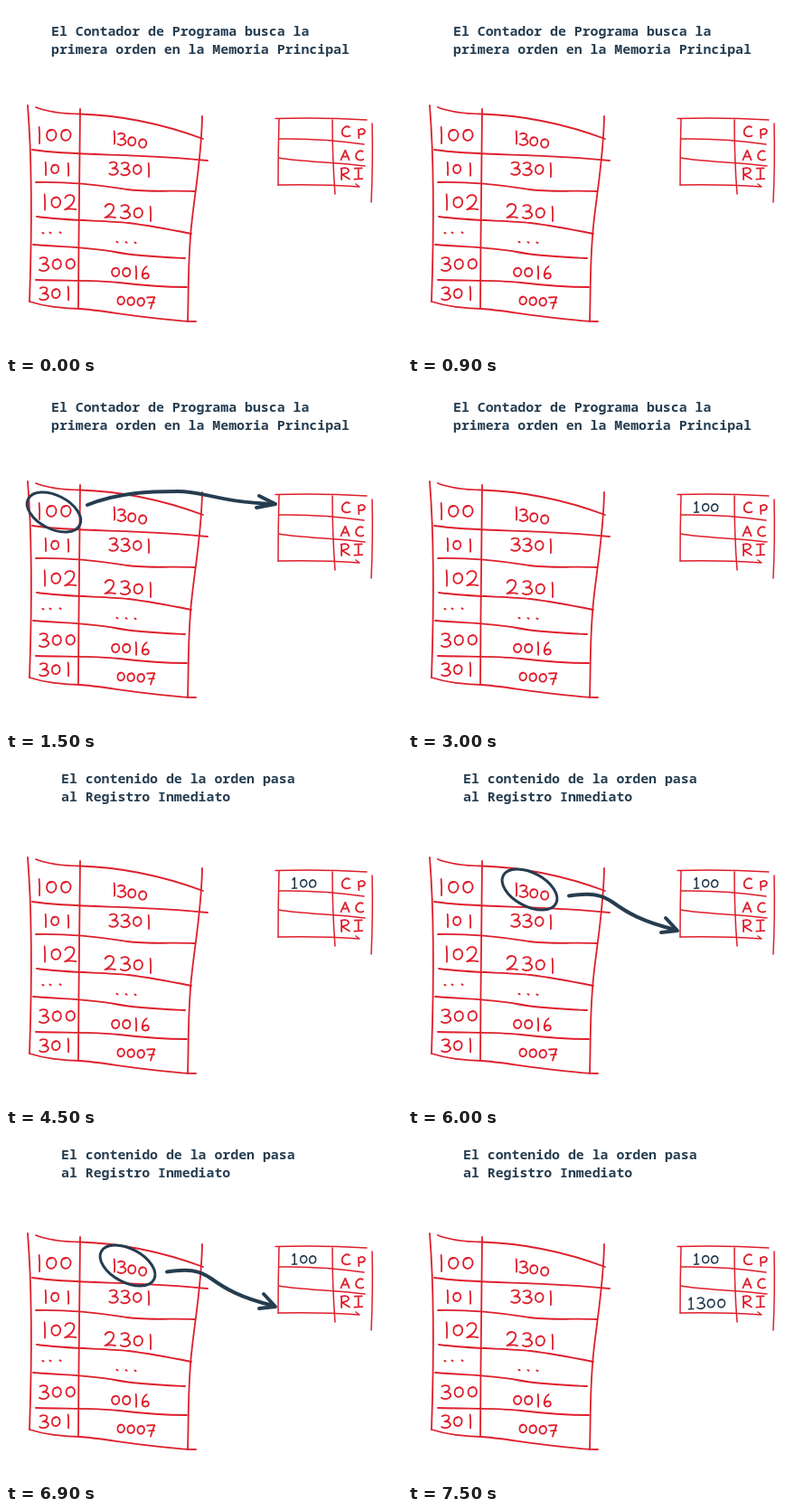
Recreate the animation shown at these times as an HTML page. Size 438x385 px, loop 8 s.

```html
<!DOCTYPE html>
<html lang="es">
<head>
<meta charset="utf-8">
<title>Ciclo de instrucción</title>
<style>
  html, body { margin: 0; width: 100%; height: 100%; overflow: hidden; background: #fff; }
  svg { display: block; width: 438px; height: 385px; }
  path { fill: none; stroke-linecap: round; stroke-linejoin: round; }
  .red { stroke: #de1f2c; stroke-width: 1.8; }
  #registers { stroke-width: 1.5; }
  .navy { stroke: #263d50; stroke-width: 1.6; }
  .mark { stroke: #263d50; stroke-width: 3; fill: none; }
  .arrow { stroke-width: 4; }
  text { font: 700 14.87px "Noto Sans Mono", "DejaVu Sans Mono", monospace; fill: #263d50; white-space: pre; }
</style>
</head>
<body>
<svg viewBox="0 0 438 385">
  <g class="red" id="memory">
    <path d="M24 110C28 160 29 240 26 327"/>
    <path d="M82 114C82 180 80 260 80 334"/>
    <path d="M217 122C216 175 207 215 204 255S202 320 201 349"/>
    <path d="M33 112Q50 119 82 119.500C130 121 175 131 218 147"/>
    <path d="M29 159C75 166 145 163 223 171"/>
    <path d="M33 195C80 194 115 200 135 203S185 204 209 205"/>
    <path d="M34 233C70 238 110 237 135 240S185 248 205 252"/>
    <path d="M30 264C70 267 95 267 120 272S175 278 198 279"/>
    <path d="M33 303C70 304 100 303 125 306S175 311 200 311"/>
    <path d="M26 327C45 333 60 334 82 335S165 348 210 349"/>
  </g>
  <g class="red" id="registers">
    <path d="M298 124.500Q350 123 399 126"/>
    <path d="M302 125Q301 160 301 198"/>
    <path d="M301 198Q350 197 391 200L387 197"/>
    <path d="M302 147Q350 146 396 153"/>
    <path d="M302 168C330 173 360 172 397 177"/>
    <path d="M361 126Q361 170 364 208"/>
    <path d="M405 130Q406 175 404 217"/>
  </g>

  <g data-from="0" data-to="4500">
    <text x="50" y="33">El Contador de Programa busca la</text>
    <text x="50" y="53">primera orden en la Memoria Principal</text>
  </g>
  <g data-from="4500" data-to="8000">
    <text x="61" y="28">El contenido de la orden pasa</text>
    <text x="61" y="48">al Registro Inmediato</text>
  </g>
  <g class="mark" data-from="1500" data-to="3000">
    <ellipse rx="32" ry="18.5" transform="translate(53 144) rotate(27)"/>
    <path class="arrow" d="M90 136C125 122 160 121 190 121S235 133 297 135"/>
    <path class="arrow" d="M280 126L298 135L277 139"/>
  </g>
  <g class="mark" data-from="6000" data-to="7500">
    <ellipse rx="33" ry="18.5" transform="translate(134.500 145.500) rotate(28)"/>
    <path class="arrow" d="M178 152.500C200 149 213 150 227 160S258 181 296 190"/>
    <path class="arrow" d="M285 177L298 191L280 193"/>
  </g>
  <g id="cp" data-from="3000" data-to="8000"></g>
  <g id="ri" data-from="7500" data-to="8000"></g>
</svg>
<script>
const LOOP = 8000;

// Handwritten strokes in a box one unit high, centred on the origin.
const GLYPHS = {
  0: 'M.04-.33C-.22-.37-.32-.08-.26.13S.02.37.17.27S.36-.11.23-.25S-.02-.33-.08-.28',
  1: 'M-.02-.5Q.03 0 0 .5',
  i: 'M-.15-.32L.02-.5V.47M-.2.48L.22.46',
  2: 'M-.33-.3C-.2-.6.32-.55.26-.2C.2.1-.1.32-.35.45Q0 .35.38.44',
  3: 'M-.28-.42C0-.58.35-.45.2-.2Q.12-.04-.1-.03C.3-.07.45.2.2.38Q-.05.53-.32.36',
  6: 'M.12-.5C-.2-.3-.28.1-.22.32C-.1.55.3.48.27.2C.22-.04-.12 0-.21.24',
  7: 'M-.3-.43Q0-.48.33-.46Q.15 0 0 .5M-.15.02L.3 0',
  '.': 'M-.04-.02L.04.03',
  C: 'M.32-.42C0-.6-.37-.3-.36.05S.05.55.38.38',
  P: 'M-.25-.25L-.22.5M-.25-.2C.1-.5.4-.25.3 0Q.2.2-.2.15',
  A: 'M-.42.48L.02-.48L.42.48M-.27.15L.3.12',
  R: 'M-.3-.45V.5M-.35-.43C.3-.65.5-.2.1-.02L-.28.06L.38.46',
  I: 'M-.3-.45L.32-.47M.02-.45V.45M-.32.47L.35.44'
};

function write(parent, color, chars, size, y, slope, xs) {
  xs.forEach((x, i) => {
    const path = document.createElementNS('http://www.w3.org/2000/svg', 'path');
    path.setAttribute('d', GLYPHS[chars[i]]);
    path.setAttribute('class', color);
    path.setAttribute('vector-effect', 'non-scaling-stroke');
    path.setAttribute('transform', `translate(${x} ${y + slope * i}) scale(${size})`);
    document.getElementById(parent).append(path);
  });
}

// characters, size, first centre y, drop per character, centres x
const memory = [
  ['100', 18, 143, 0, [37, 50, 66]],
  ['1300', 14, 145.5, 2.2, [120, 128, 139, 151]],
  ['101', 14, 180, .4, [44, 54, 69]],
  ['3301', 15, 180, .5, [119, 132, 145, 158]],
  ['102', 17, 217, .3, [43, 55, 71]],
  ['2301', 16, 227, 1, [115, 132, 146, 160]],
  ['...', 16, 251, -.2, [41, 49, 60]],
  ['...', 16, 261, .4, [123, 133, 143]],
  ['300', 16, 286, -.3, [42, 56, 71]],
  ['0016', 14, 294.5, .2, [121, 133, 144, 154]],
  ['301', 15, 318.5, -.3, [42, 55, 69]],
  ['0007', 13, 326, .7, [127, 138, 149, 160]]
];
const registers = [
  ['CP', 12, 139, 1, [376, 393]],
  ['AC', 11, 165, .5, [375, 391]],
  ['RI', 13, 185.5, 0, [375, 389.5]]
];

memory.forEach(word => write('memory', 'red', ...word));
registers.forEach(word => write('registers', 'red', ...word));
write('cp', 'navy', 'i00', 12, 138.5, .3, [319, 329, 339]);
write('ri', 'navy', 'i300', 13, 187.5, 0, [313, 324, 335, 346.5]);

for (const el of document.querySelectorAll('[data-from]')) {
  const from = el.dataset.from / LOOP, to = el.dataset.to / LOOP;
  const steps = [[0, from ? 0 : 1], [from, 1], [to, to < 1 ? 0 : 1], [1, to < 1 ? 0 : 1]];
  el.animate(
    steps.map(([offset, opacity]) => ({ offset, opacity, easing: 'steps(1, end)' })),
    { duration: LOOP, iterations: Infinity }
  );
}
</script>
</body>
</html>
```
